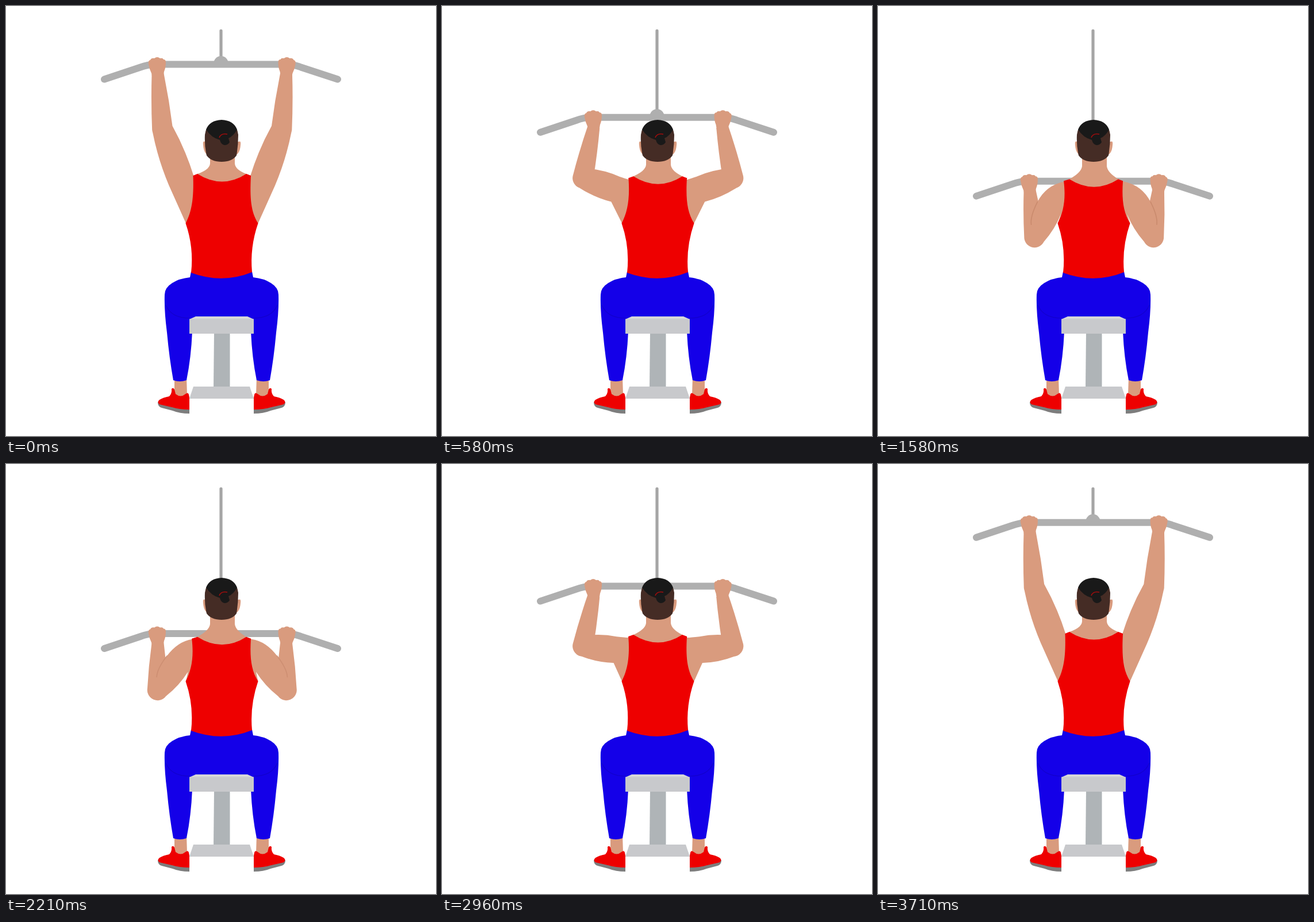
An HTML page that plays this animation: 748 by 748 pixels, repeating every 3750 ms.

```html
<!DOCTYPE html>
<html lang="en">
<head>
<meta charset="utf-8">
<title>Lat pulldown</title>
<style>
  html, body { margin: 0; width: 100%; height: 100%; overflow: hidden; background: #fff; }
  svg { display: block; width: 100vw; height: 100vh; }
  .skin { fill: #d99b7e; }
  .red { fill: #ee0000; }
  .blue { fill: #1400e8; }
  .metal { fill: none; stroke: #afafaf; stroke-linecap: round; }
  .seat { fill: #c8c9cc; }
</style>
</head>
<body>
<svg viewBox="0 0 748 748">
  <defs>
    <g id="leg">
      <path class="skin" d="M293 645H314L315 676 305 682 293 676Z"/>
      <path fill="#7d7d7d" d="M264 689Q264 697 271 699L290 704Q302 709 319 709V698Z"/>
      <path class="red" d="M288 666Q291 663 293 667L295 675Q304 682 312 675Q317 671 318 676L319 681V702Q302 702 289 698L267 693Q262 689 267 685Q273 681 284 679Q289 674 288 666Z"/>
      <path class="blue" d="M376 462H322L320 472Q301 474 289 482Q276 490 276 502Q275 530 280 568Q284 612 291 651Q302 655 314 651Q322 612 324 566L326 548H376Z"/>
      <path d="M278 520Q287 543 320 543" fill="none" stroke="#1200cc" stroke-width="1.2"/>
    </g>
    <g id="limb">
      <path id="arm" class="skin"/>
      <path id="crease" fill="none" stroke="#c98a6d" stroke-width="1.6" stroke-linecap="round"/>
      <path id="hand" class="skin" d="M248 101Q247 95 251 94Q253 90 258 91Q263 87 268 91Q273 90 274 93Q278 93 278 98Q278 107 275 114L273 126H255L253 117Q249 109 248 101Z"/>
    </g>
    <path id="ear" class="skin" d="M350 236H346Q342 234 343 242Q344 256 351 259Z"/>
  </defs>

  <path id="cable" class="metal" stroke-width="5.2" style="stroke:#a5a5a5"/>
  <g id="bar">
    <path d="M361 101A13 14 0 0 1 387 101Z" fill="#afafaf"/>
    <path class="metal" stroke-width="12" d="M171 127.500L234 106.500Q248 101.500 260 101.500H488Q500 101.500 513 106.500L577 127.500"/>
  </g>

  <use href="#limb"/>
  <use href="#limb" transform="matrix(-1 0 0 1 751.500 0)"/>

  <path id="neck" class="skin"/>
  <use href="#ear"/>
  <use href="#ear" transform="matrix(-1 0 0 1 751 0)"/>
  <path fill="#452c25" d="M346 224Q347 210 360 203H390Q403 210 404 224Q404 242 401 260Q393 271 375 271Q357 271 349 260Q345 243 346 224Z"/>
  <path fill="#191919" d="M348 215Q354 199 375 198Q396 199 402 215Q396 226 387 230L389 237Q386 242 380 242Q374 241 372 233Q357 229 348 215Z"/>
  <path d="M371 229Q374 221 385 223" fill="none" stroke="#a30d0d" stroke-width="1.500"/>

  <use href="#leg"/>
  <use href="#leg" transform="matrix(-1 0 0 1 750 0)"/>
  <path id="shirt" class="red"/>

  <path fill="#afb4b7" d="M362 568H389.500V664H361Z"/>
  <path class="seat" d="M326 662H424L431 683H319Z"/>
  <path fill="#d6d7d9" d="M330 540H420L431 545H319Z"/>
  <path class="seat" d="M319 544.500H431V570H319Z"/>
</svg>
<script>
  const LOOP = 3750, FRAMES = 90, LOW = 41, DROP = 204, EASE = .32;
  const UPPER = 23, ELBOW = 18, WRIST = 10.5;
  const el = id => document.getElementById(id);
  const set = (id, attrs) => Object.entries(attrs).forEach(([k, v]) => el(id).setAttribute(k, v));
  const pt = p => p.map(v => v.toFixed(2)).join(' ');

  // cubic-bezier(EASE, 0, EASE, 1)
  function ease(x) {
    let lo = 0, hi = 1, s = x;
    for (let i = 0; i < 24; i++) {
      s = (lo + hi) / 2;
      if (3 * EASE * s * (1 - s) + s * s * s < x) lo = s; else hi = s;
    }
    return s * s * (3 - 2 * s);
  }

  // Returns at(t, side): a point t of the way along the bone, pushed sideways in pixels.
  function bone(a, b) {
    const dx = b[0] - a[0], dy = b[1] - a[1], len = Math.hypot(dx, dy);
    return (t, side) => [a[0] + dx * t + dy / len * side, a[1] + dy * t - dx / len * side];
  }

  // Tapered limb with a round far end.
  const limb = (at, near, mid, far) =>
    `M${pt(at(0, near))}Q${pt(at(.5, mid))} ${pt(at(1, far))}` +
    `A${far} ${far} 0 0 1 ${pt(at(1, -far))}Q${pt(at(.5, -mid))} ${pt(at(0, -near))}Z`;

  function drawArm(d) {
    const wrist = [264, 118 + d];
    const shoulder = [305 - d * .035, 304 + d * .1 + d * d * .00065];
    // The elbow travels down at an even rate along half an ellipse.
    const ey = 214 + d * .926;
    const elbow = [281 - 36 * Math.sqrt(1 - ((ey - 308) / 97) ** 2), ey];

    const fore = bone(wrist, elbow), upper = bone(shoulder, elbow);
    const reach = Math.hypot(elbow[0] - shoulder[0], elbow[1] - shoulder[1]);
    const cap = `M${pt(upper(0, -UPPER))}Q${pt(upper(-32 / reach, -UPPER))} 324 ${294 + d * .055}` +
      `L340 300V380L313 378 ${pt(upper(0, UPPER))}Z`;
    set('arm', { d: limb(fore, WRIST, 16, ELBOW) + limb(upper, UPPER, 25.5, ELBOW) + cap });
    set('crease', {
      d: `M${pt(upper(0, -UPPER))}Q${pt(upper(.5, -UPPER))} ${pt(upper(.7, -15))}`,
      opacity: Math.max(0, Math.min(1, (d - 172) / 30))
    });
  }

  // Neckline and straps sink a little as the shoulders drop.
  function drawTorso(d) {
    const y = v => v + d * .045, trap = v => v + d * .022;
    const l = 325.5 - d * .012, r = 426;
    set('neck', {
      d: `M355 255V${trap(274)}Q354 ${trap(285)} 333 ${y(292)}L${l} ${y(296)}V${y(320)}H${r}V${y(296)}` +
        `L418 ${y(292)}Q399 ${trap(285)} 398 ${trap(274)}V255Z`
    });
    set('shirt', {
      d: `M${l} ${y(295)}L333 ${y(292)}Q376 ${y(319)} 418 ${y(292)}L${r} ${y(295)}` +
        `C424 335 426 358 438.5 378Q424 420 428 463Q376 484 322 464Q327 420 312.5 378C323 358 327 335 ${l} ${y(295)}Z`
    });
  }

  function draw(d) {
    const transform = `translate(0 ${d})`;
    set('bar', { transform });
    set('hand', { transform });
    set('cable', { d: `M374 43V${95 + d}` });
    drawArm(d);
    drawTorso(d);
  }

  const start = performance.now();
  function tick(now) {
    const t = Math.max(0, now - start) % LOOP;
    const f = Math.floor((t + 4) * FRAMES / LOOP) % FRAMES;
    draw(DROP * ease(f < LOW ? f / LOW : (FRAMES - f) / (FRAMES - LOW)));
    requestAnimationFrame(tick);
  }
  draw(0);
  requestAnimationFrame(tick);
</script>
</body>
</html>
```
